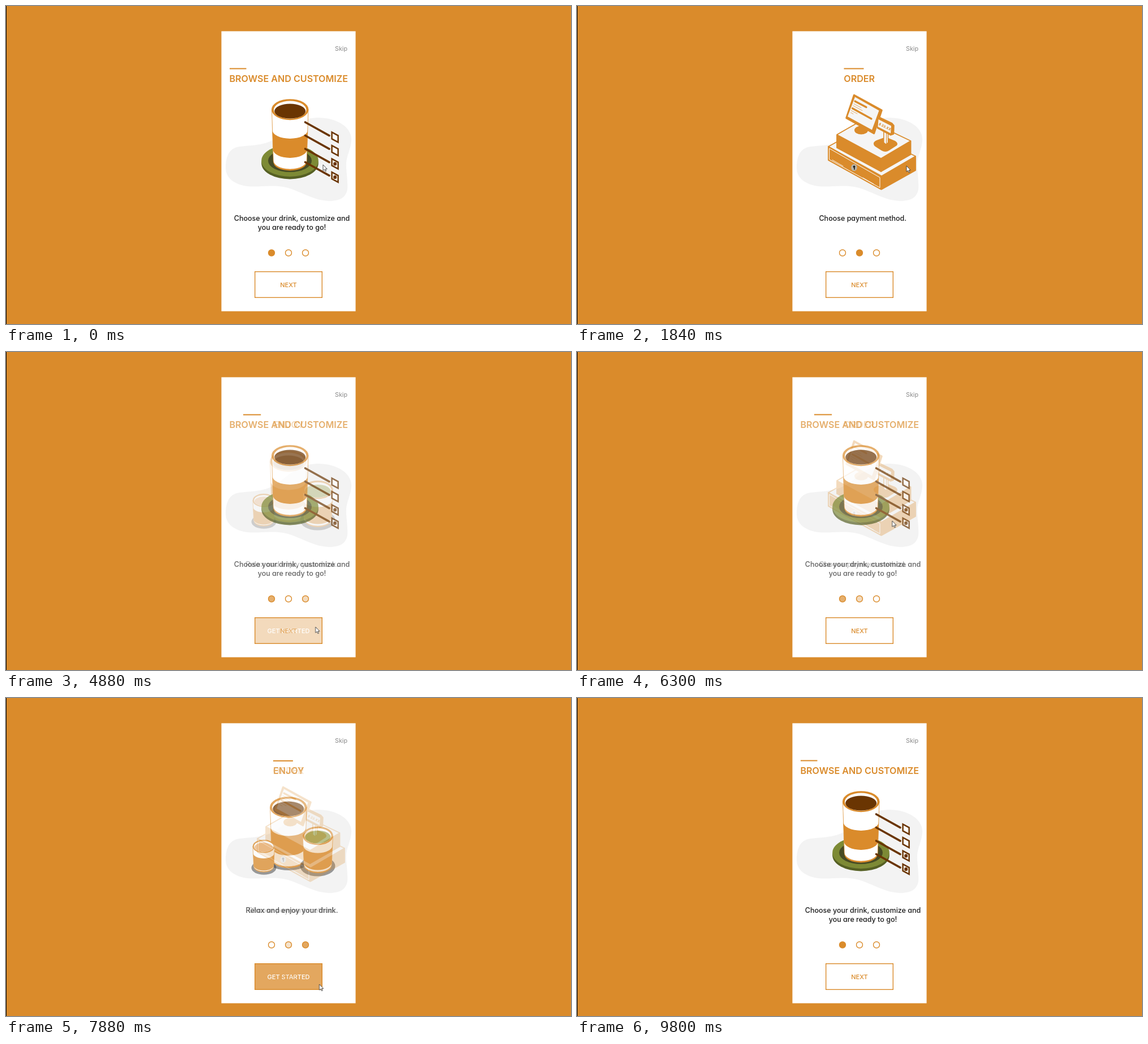
An HTML page that plays this animation: 998 by 561 pixels, repeating every 9840 ms.

```html
<!DOCTYPE html>
<html lang="en">
<head>
<meta charset="utf-8">
<title>Coffee app onboarding</title>
<style>
  :root { --gold: #da8b2b; --brown: #6a3502; --pale: #f5f5f5; }
  html, body { margin: 0; width: 100%; height: 100%; overflow: hidden; background: var(--gold); }
  svg { display: block; width: 998px; height: 561px; }
  text { font-family: Inter, "Open Sans", sans-serif; font-feature-settings: "cv11"; font-weight: 500; }
  .title { font-size: 16.1px; font-weight: 600; fill: var(--gold); }
  .body { font-size: 12.5px; fill: #1c1c1c; text-anchor: middle; }
  .label { font-size: 11px; text-anchor: middle; }
  .gold { fill: var(--gold); }
  .pale { fill: var(--pale); }
  .ring { fill: none; stroke: var(--gold); stroke-width: 1.4; }

  .browse, .order, .enjoy, .next, #bar {
    animation: 9840ms ease-out infinite;
  }
  .browse { animation-name: browse; }
  .order { animation-name: order; }
  .enjoy { animation-name: enjoy; }
  .next { animation-name: next; }
  #bar { animation-name: bar; }
  #cursor { animation: move 9840ms ease-in-out infinite, hide 9840ms step-end infinite; }

  @keyframes browse {
    0%, 6.504% { opacity: 1 }
    9.553%, 48.069% { opacity: 0 }
    51.118%, 63.415% { opacity: 1 }
    66.463%, 96.2% { opacity: 0 }
    99.29%, 100% { opacity: 1 }
  }
  @keyframes order {
    0%, 6.504% { opacity: 0 }
    9.553%, 21.646% { opacity: 1 }
    24.695%, 63.415% { opacity: 0 }
    66.463%, 78.354% { opacity: 1 }
    81.402%, 100% { opacity: 0 }
  }
  @keyframes enjoy {
    0%, 21.646% { opacity: 0 }
    24.695%, 48.069% { opacity: 1 }
    51.118%, 78.354% { opacity: 0 }
    81.402%, 96.2% { opacity: 1 }
    99.29%, 100% { opacity: 0 }
  }
  @keyframes next {
    0%, 21.646% { opacity: 1 }
    24.695%, 48.069% { opacity: 0 }
    51.118%, 78.354% { opacity: 1 }
    81.402%, 96.2% { opacity: 0 }
    99.29%, 100% { opacity: 1 }
  }
  @keyframes bar {
    0%, 6.504% { x: 395px; y: 109.5px; width: 29.5px }
    9.553%, 21.646% { x: 471.5px; y: 109.5px; width: 35px }
    24.695%, 48.069% { x: 472px; y: 110px; width: 35px }
    51.118%, 63.415% { x: 395px; y: 109.5px; width: 29.5px }
    66.463%, 78.354% { x: 471.5px; y: 109.5px; width: 35px }
    81.402%, 96.2% { x: 472px; y: 110px; width: 35px }
    99.29%, 100% { x: 395px; y: 109.5px; width: 29.5px }
  }
  @keyframes move {
    0%, .7% { transform: translate(560px, 280px) }
    2.54%, 4.67% { transform: translate(574px, 284px) }
    9.2%, 11.7% { transform: translate(480px, 290px) }
    18.6%, 20.3% { transform: translate(582px, 282px) }
    24.9% { transform: translate(456px, 298px) }
    28.35% { transform: translate(458px, 299px) }
    32.6%, 35.2% { transform: translate(596px, 331px) }
    38.6%, 40.2% { transform: translate(540px, 484px) }
    42%, 50% { transform: translate(546.7px, 485px) }
    57.6%, 62.5% { transform: translate(576px, 300px) }
    67.1%, 68.7% { transform: translate(493px, 291px) }
    71.6% { transform: translate(600px, 400px) }
    75%, 89.8% { transform: translate(553.5px, 505px) }
    91.5% { transform: translate(563px, 501px) }
    93.3%, 100% { transform: translate(549px, 505px) }
  }
  @keyframes hide {
    0% { opacity: 1 }
    99.3%, 100% { opacity: 0 }
  }
</style>
</head>
<body>
<svg viewBox="0 0 998 561">
  <rect class="gold" width="998" height="561"/>
  <rect width="1" height="561"/>
  <rect x="380.5" y="44.5" width="237" height="494" fill="#fff"/>
  <path fill="#f3f3f3" d="M388 285C388 264 395 250 413 248C440 245 460 246 482 230C505 212 520 198 550 197C585 197 612 214 610 238C608 258 600 264 601 285C602 300 604 312 603 324C600 338 590 344 570 344C535 342 515 321 482 318C455 316 440 321 420 317C400 312 388 302 388 285Z"/>
  <g id="art"></g>

  <text x="581" y="79" style="font-size:10.8px;font-weight:400" fill="#888">Skip</text>
  <rect id="bar" class="gold" x="395" y="109.5" width="29.5" height="2"/>

  <g class="enjoy">
    <text class="title" x="472" y="134">ENJOY</text>
    <text class="body" x="505" y="379">Relax and enjoy your drink.</text>
    <circle class="gold" cx="529" cy="435.5" r="5.5"/>
    <rect class="gold" x="439" y="468" width="120" height="47"/>
    <text class="label" x="499" y="495.5" fill="#fff">GET STARTED</text>
  </g>
  <g class="order">
    <text class="title" x="471.3" y="134">ORDER</text>
    <text class="body" x="504.8" y="379">Choose payment method.</text>
    <circle class="gold" cx="499" cy="435.5" r="5.5"/>
  </g>
  <g class="browse">
    <text class="title" x="394.5" y="134">BROWSE AND CUSTOMIZE</text>
    <text class="body" x="505" y="379">Choose your drink, customize and</text>
    <text class="body" x="505" y="395.3">you are ready to go!</text>
    <circle class="gold" cx="469" cy="435.5" r="5.5"/>
  </g>
  <text class="label gold next" x="499" y="495.5">NEXT</text>

  <g class="ring">
    <circle cx="469" cy="435.5" r="5.5"/>
    <circle cx="499" cy="435.5" r="5.5"/>
    <circle cx="529" cy="435.5" r="5.5"/>
    <rect x="439.7" y="468.7" width="118.6" height="45.6"/>
  </g>
  <path id="cursor" d="M0 0V10.3L2.5 8.2 4.1 11.8 5.7 11.1 4.2 7.6H7.2Z" fill="#fff" stroke="#3a3a3a" stroke-width=".9"/>
</svg>
<script>
const ellipse = (cx, cy, rx, ry, fill) =>
  `<ellipse cx="${cx}" cy="${cy}" rx="${rx}" ry="${ry}" fill="${fill}"/>`;
const poly = (points, attrs) => `<polygon points="${points}" ${attrs}/>`;
const line = (d, color, width) =>
  `<path d="${d}" fill="none" stroke="${color}" stroke-width="${width}" stroke-linecap="round"/>`;

const GOLD = 'var(--gold)', BROWN = 'var(--brown)', PALE = 'var(--pale)';

// bandTop, bandEnd and base are the lowest points of each curve
function cup(cx, cy, rx, ry, drink, bandTop, bandEnd, base) {
  const depth = ry * .82, k = rx / 32.5;
  const half = y => rx * (.985 - .085 * (y - depth - cy) / (base - depth - cy));
  const slab = (y0, y1, attrs) => {
    const a = half(y0), b = half(y1), s0 = y0 - depth, s1 = y1 - depth;
    return `<path d="M${cx - a} ${s0}A${a} ${depth} 0 0 0 ${cx + a} ${s0}L${cx + b} ${s1}` +
      `A${b} ${depth} 0 0 1 ${cx - b} ${s1}Z" ${attrs}/>`;
  };
  return slab(cy + depth, base, `fill="${GOLD}"`) +
    slab(cy + depth, base - 2.5 * k, `fill="#fff" stroke="${GOLD}" stroke-width=".7"`) +
    slab(bandTop, bandEnd, `fill="${GOLD}"`) +
    ellipse(cx, cy, rx, ry, GOLD) +
    ellipse(cx, cy + .4 * k, rx * .88, ry * .84, '#fff') +
    ellipse(cx, cy + 2.8 * k, rx * .84, ry * .7, drink);
}

function browse() {
  let s = ellipse(501.5, 277.5, 50.3, 28, '#566024') +
    ellipse(501.5, 273, 50.3, 28, '#7d8a35') +
    ellipse(501.5, 273, 38.5, 20, '#474b24') +
    cup(501.7, 182.7, 32.7, 18.5, BROWN, 234, 268, 290.5);
  for (let i = 0; i < 4; i++) {
    const y = 205 + i * 23.5;
    s += line(`M528.5 ${y}L571 ${y + 23.6}`, BROWN, 3.6) +
      `<path d="M575.6 ${y + 17.6}L586.6 ${y + 23.6}V${y + 35.4}L575.6 ${y + 29.4}Z" fill="#fff" stroke="${BROWN}" stroke-width="2.5"/>`;
    if (i > 1) s += ellipse(581.1, y + 26.4, 3, 3.2, BROWN);
  }
  return s;
}

function register() {
  const edge = `stroke="${GOLD}" stroke-width="1.8" stroke-linejoin="round"`;
  const fill = `fill="${GOLD}"`, pale = `fill="${PALE}"`;
  return poly('444,248 500,217 598,265 538,300', `${pale} ${edge}`) +
    // drawer
    poly('444,248 537,301 537,323.5 444,272', `${fill} ${edge}`) +
    poly('538,301 598,266 598,290 538,323.5', `${fill} ${edge}`) +
    line('M446 251.5L535 302.5V320.5L446 271Z', '#fff', 1) +
    line('M451 271.5L470 282.5M505 303L524 314', '#fff', .9) +
    ellipse(489.5, 285, 5.3, 6, '#b8b5ab') +
    ellipse(489.5, 283.5, 1.9, 2, '#222') +
    line('M489.7 284L490 288', '#222', 1.8) +
    // upper box
    poly('459,228 537,270 537,292 459,250', `${fill} ${edge}`) +
    poly('537,270 589.5,239 589.5,262 537,292', `${fill} ${edge}`) +
    poly('459,227 508,199 589.5,238 537,269', `${pale} ${edge}`) +
    // screen
    ellipse(502, 219, 12, 7.5, GOLD) +
    poly('489.5,157.5 538,184 524.5,224.5 476,197.5', `${fill} stroke="${GOLD}" stroke-width="3.5" stroke-linejoin="round"`) +
    poly('491,160.5 533.5,184.5 521,218.5 478,195', pale) +
    `<g stroke-linecap="butt">` +
    line('M491 168L511 178.5M486.5 180.5L520 199', GOLD, 3.2) +
    line('M489 172.5L502 179.5M488 176L504 184.5M484.5 184.5L495 190M483.5 188L488 190.5', GOLD, .7) +
    `</g>` +
    // price display
    `<path d="M524 243.5Q523 240 529 237L540 233Q545 231 550 233L562 238Q568 242 565 246L551 255Q545 259 538 255L527 248Q524 246 524 243.5Z" ${fill}/>` +
    poly('541.8,219 549.5,222 549.5,241 545.5,244 541.8,241', `${pale} stroke="${GOLD}" stroke-width="1.5"`) +
    line('M546.5 222V242', GOLD, 1) +
    poly('534,197 556,207.5 559,211 558.5,225.5 554,227 531.5,215', `${fill} stroke="${GOLD}" stroke-width="3.4" stroke-linejoin="round"`) +
    poly('532.5,200 555,211.5 554,224.5 531.5,213', pale) +
    `<text transform="translate(532.6 209.5) rotate(27)" class="gold" style="font-size:5.8px;font-weight:800">$ 23.XX</text>`;
}

function cups() {
  const shade = 'rgba(0,0,0,.5)';
  return ellipse(499, 288, 36, 16, shade) +
    cup(498.8, 192.7, 32.7, 18.5, BROWN, 243.5, 278, 300) +
    ellipse(455.5, 299.5, 22, 12.3, shade) +
    cup(455.2, 261.7, 19.5, 11.6, '#edb985', 283, 304.5, 307.5) +
    ellipse(550.5, 296.5, 31, 18, shade) +
    cup(550.8, 243, 27, 16.2, '#8f993b', 273.5, 303.5, 309);
}

document.getElementById('art').innerHTML =
  `<g class="enjoy">${cups()}</g><g class="order">${register()}</g><g class="browse">${browse()}</g>`;
</script>
</body>
</html>
```
